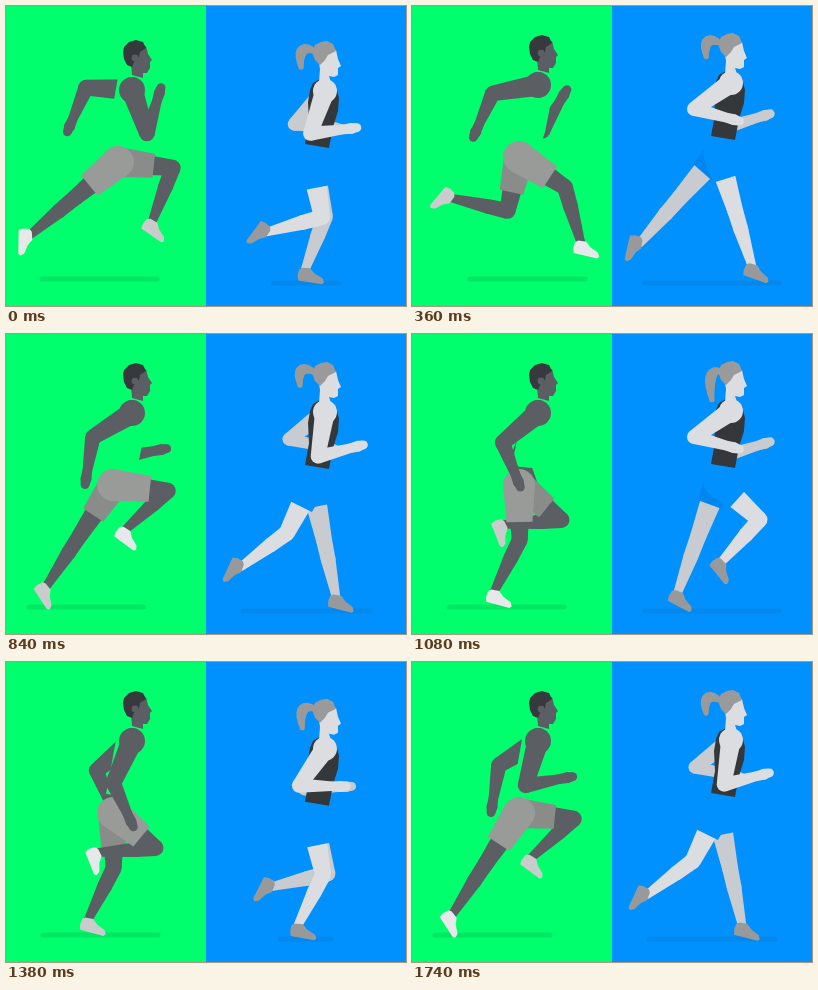
Animation of 400x300 px, one loop 1.8 s. Source, as an HTML page with a canvas:

```html
<!DOCTYPE html>
<html lang="en">
<head>
<meta charset="utf-8">
<title>Two runners</title>
<style>
html, body { margin: 0; width: 100%; height: 100%; overflow: hidden; background: #0091ff; }
canvas { display: block; width: 100vw; height: 100vh; }
</style>
</head>
<body>
<canvas id="stage" width="400" height="300"></canvas>
<script>
const ctx = document.getElementById('stage').getContext('2d');
const STEP = 60, STEPS = 30, TAU = Math.PI * 2, DEG = Math.PI / 180;
const GREEN = '#00ff6c', BLUE = '#0091ff';
const { sin, cos, max, hypot, floor } = Math;

const mix = (a, b, k) => a.map((v, i) => v + (b[i] - v) * k);

// Point at an angle measured forward from straight down.
const reach = ([x, y], deg, len) => [x + len * sin(deg * DEG), y + len * cos(deg * DEG)];

// Periodic smooth path through a few keys of [time, x, y, turn].
function path(keys, period) {
  const n = keys.length;
  const at = i => {
    const [t, ...v] = keys[(i + n) % n];
    return { t: t + floor(i / n) * period, v };
  };
  return time => {
    const t = time % period;
    let i = 0;
    while (at(i + 1).t <= t) i++;
    const [a, b, c, d] = [i - 1, i, i + 1, i + 2].map(at);
    const h = c.t - b.t, u = (t - b.t) / h, w = u * u * (3 - 2 * u);
    return b.v.map((y, j) => {
      const m0 = (c.v[j] - a.v[j]) / (c.t - a.t) * h;
      const m1 = (d.v[j] - y) / (d.t - b.t) * h;
      return y + (c.v[j] - y) * w + u * (1 - u) * ((1 - u) * m0 - u * m1);
    });
  };
}

function poly(color, xy) {
  ctx.fillStyle = color;
  ctx.beginPath();
  for (let i = 0; i < xy.length; i += 2) ctx.lineTo(xy[i], xy[i + 1]);
  ctx.closePath();
  ctx.fill();
}

function disc(color, [x, y], r) {
  ctx.fillStyle = color;
  ctx.beginPath();
  ctx.arc(x, y, r, 0, TAU);
  ctx.fill();
}

// Tapered segment with a flat far end.
function bone(color, a, b, r0, r1) {
  const [x0, y0] = a, [x1, y1] = b, d = hypot(x1 - x0, y1 - y0) || 1;
  const nx = (y0 - y1) / d, ny = (x1 - x0) / d;
  disc(color, a, r0);
  poly(color, [x0 + nx * r0, y0 + ny * r0, x1 + nx * r1, y1 + ny * r1,
    x1 - nx * r1, y1 - ny * r1, x0 - nx * r0, y0 - ny * r0]);
}

function limb(color, pts, radii) {
  const last = pts.length - 1;
  for (let i = 0; i < last; i++) bone(color, pts[i], pts[i + 1], radii[i], radii[i + 1]);
  disc(color, pts[last], radii[last]);
}

// Knee bends forward; a leg out of reach stretches.
function bend([x, y], [ax, ay, turn], thigh, shin) {
  const dx = ax - x, dy = ay - y, d = hypot(dx, dy), s = max(1, d / (thigh + shin));
  const p = thigh * s, q = shin * s, along = (p * p - q * q + d * d) / (2 * d);
  const out = Math.sqrt(max(0, p * p - along * along));
  const knee = [x + (dx * along + dy * out) / d, y + (dy * along - dx * out) / d];
  return { hip: [x, y], knee, ankle: [ax, ay], turn };
}

function drawLeg({ hip, knee, ankle, turn }, skin, shoe) {
  limb(skin, [hip, knee, mix(knee, ankle, .35), ankle], [12, 8, 7.4, 4.2]);
  ctx.save();
  ctx.translate(...ankle);
  ctx.rotate(turn * DEG);
  poly(shoe, [-6, 0, -3, -2, 5, -2, 10, 3, 18, 7, 20, 11, 18, 13, -6, 11, -7, 6]);
  ctx.restore();
}

function drawShorts({ hip, knee }, color, length, r0, r1) {
  const k = length / hypot(knee[0] - hip[0], knee[1] - hip[1]);
  bone(color, hip, mix(hip, knee, k), r0, r1);
}

function drawArm({ shoulder, elbow, hand }, skin, r) {
  disc(skin, shoulder, r);
  limb(skin, [shoulder, elbow, mix(elbow, hand, .7), mix(elbow, hand, .88), hand],
    [r * .83, r * .6, 4.8, 5.4, 4.4]);
}

function shadow(color, x, y, half) {
  ctx.fillStyle = color;
  ctx.beginPath();
  ctx.roundRect(x - half, y - 2.5, half * 2, 5, 2.5);
  ctx.fill();
}

function shifted(dy, paint) {
  ctx.save();
  ctx.translate(0, dy);
  paint();
  ctx.restore();
}

const MAN = 10, WOMAN = 15;
const manFoot = path([
  [0, 24, 229, 86], [1, 39, 192, 125], [4, 119, 196, 32], [5, 146, 216, 30],
  [6, 169, 237, 8], [8, 82, 258, 10], [9, 40, 253, 52]], MAN);
const womanFoot = path([
  [0, 261, 226, 122], [1.5, 274, 225, 78], [3.5, 319, 231, 38], [6, 340, 260, 15],
  [7.5, 299, 264, 4], [11, 260, 257, 30], [13.5, 228, 237, 98]], WOMAN);

function manArm(f) {
  const a = f / MAN * TAU, shoulder = [126, 79];
  const upper = -37 + 44 * cos(a) + 18 * sin(a) + 12 * cos(3 * a);
  const flex = 84 + 45 * cos(a) + 9 * sin(a) + 23 * cos(2 * a) + 9 * sin(2 * a) - 8 * cos(3 * a);
  const elbow = reach(shoulder, upper, 46);
  return { shoulder, elbow, hand: reach(elbow, upper + flex, 48) };
}

function womanArm(f) {
  const a = (f - 12) / WOMAN * TAU, shoulder = [319, 77];
  const elbow = reach(shoulder, -31 + 28 * cos(a) - 4 * cos(3 * a), 45);
  return { shoulder, elbow, hand: reach(elbow, 91 + 20 * cos(a), 47) };
}

function man(f) {
  const skin = '#5b5f64', a = f / MAN * 2 * TAU;
  const bob = 5 * max(0, cos(a)) ** 4, hip = [107 + bob, 151 + bob];
  const leg = t => bend(hip, manFoot(t), 55, 58);
  const near = leg(f), far = leg(f + MAN / 2);
  shadow('#00e763', 100 - 6.5 * cos(a) + 18.4 * sin(a), 273, 60);
  shifted(bob, () => {
    drawArm(manArm(f + MAN / 2), skin, 13);
    poly(GREEN, [112, 66, 140, 68, 140, 88, 137, 106, 133, 126, 130, 135, 100, 132, 106, 100]);
  });
  drawLeg(far, skin, '#c9cccb');
  drawShorts(far, '#8a8c8a', 36, 15, 12);
  drawLeg(near, skin, '#e6e8e9');
  drawShorts(near, '#999b99', 37, 16, 13);
  shifted(bob, () => {
    poly(skin, [125, 40, 140, 35, 142, 43, 146, 49, 144, 51, 144, 57, 141, 62, 137, 62, 137, 67, 126, 64, 125, 52]);
    poly('#363a3f', [117, 41, 118, 36, 123, 31, 130, 29, 137, 31, 140, 37, 134, 41, 133, 46, 128, 51, 126, 56, 121, 54, 118, 48]);
    disc(skin, [129, 47], 3.4);
    drawArm(manArm(f), skin, 13);
  });
}

function ponytail(color, swing) {
  const root = [308, 37], bow = [292 + 2 * swing, 31 + 4 * swing], tip = [297 + 3 * swing, 58 + 8 * swing];
  const pts = [], radii = [];
  for (let k = 0; k <= 1; k += .125) {
    pts.push(mix(mix(root, bow, k), mix(bow, tip, k), k));
    radii.push(2.6 + 2.8 * sin(Math.PI * k));
  }
  limb(color, pts, radii);
}

function woman(f) {
  const skin = '#dbdde1', dim = '#c8cbcf', shoe = '#98999b', hair = '#9a9a9a';
  const beat = t => cos((f - t) / WOMAN * 2 * TAU);
  const dip = max(0, beat(.75)), bob = 10 * dip, hip = [306, 148 + bob];
  const leg = t => bend(hip, womanFoot(t), 56, 57);
  const near = leg(f), far = leg(f + WOMAN / 2);
  shadow('#0488ee', 300, 277, 70 - 43 * dip);
  shifted(bob, () => drawArm(womanArm(f + WOMAN / 2), dim, 11));
  drawLeg(far, dim, shoe);
  // Only a trailing thigh is in shade.
  drawShorts(far, far.knee[0] < hip[0] - 15 ? '#0087ef' : BLUE, 24, 14, 12.5);
  drawLeg(near, skin, shoe);
  drawShorts(near, BLUE, 26, 14.5, 13);
  shifted(bob, () => {
    poly('#34383b', [307, 69, 314, 65, 324, 66, 330, 72, 333, 84, 332, 97, 327, 113, 323, 134, 299, 130, 303, 108, 302, 88, 304, 76]);
    poly(skin, [312, 42, 320, 39, 330, 36, 332, 45, 335, 52, 332, 54, 332, 61, 328, 63, 323, 62, 325, 68, 313, 68, 314, 55]);
    poly(hair, [306, 38, 309, 31, 315, 28, 321, 27, 327, 30, 330, 37, 322, 41, 319, 46, 314, 51, 309, 46]);
    ponytail(hair, beat(2.7));
    drawArm(womanArm(f), skin, 12);
  });
}

function draw(now) {
  const f = floor(now / STEP) % STEPS;
  ctx.fillStyle = BLUE;
  ctx.fillRect(0, 0, 400, 300);
  ctx.fillStyle = GREEN;
  ctx.fillRect(0, 0, 200, 300);
  man(f);
  woman(f);
}

const start = performance.now();
function tick() {
  draw(performance.now() - start);
  requestAnimationFrame(tick);
}
tick();
</script>
</body>
</html>
```
